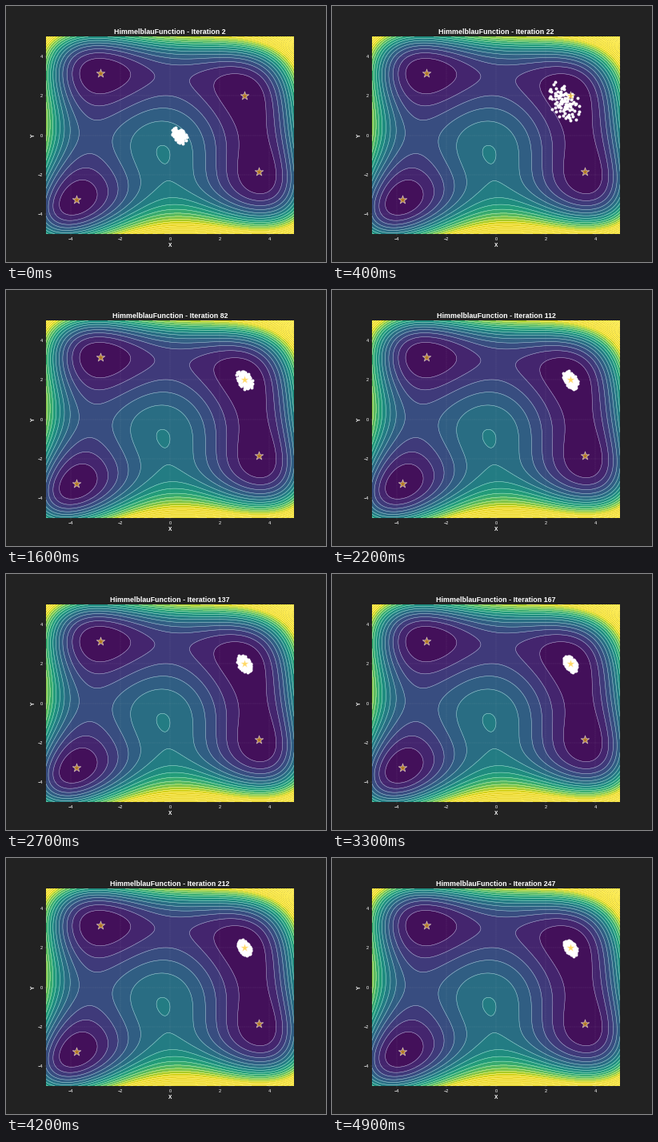
Animation, 400 px wide and 320 px high, one loop 5000 ms. Source, as a matplotlib script:

```python
import matplotlib.pyplot as plt
import numpy as np
from matplotlib.animation import FuncAnimation

FRAMES, INTERVAL = 50, 100
BACKGROUND = "#222222"
MINIMA = np.array([(3, 2), (-2.805, 3.131), (-3.779, -3.283), (3.584, -1.848)])
START = np.array([0.36, 0.0])
LAG = np.array([0.06, -0.3])
COUNT = 100

plt.rcParams["font.family"] = "Liberation Sans"


def himmelblau(x, y):
    return (x**2 + y - 11) ** 2 + (x + y**2 - 7) ** 2


rng = np.random.default_rng(7)
index = np.arange(COUNT)
disc_radius = np.sqrt((index + 0.5) / COUNT)
disc_angle = index * np.pi * (3 - np.sqrt(5))
phase = rng.uniform(0, 2 * np.pi, (2, COUNT))
speed = rng.uniform(0.3, 0.9, (2, COUNT))
# The settled swarm follows the level ellipse around the minimum (3, 2).
ellipse = 0.05 * np.linalg.cholesky(np.array([[34, -20], [-20, 74]]))


def swarm(i):
    t = min(i / 5, 1)
    ease = t * t * (3 - 2 * t)
    center = START + (MINIMA[0] - START) * ease
    center = center + LAG * np.exp(-(((i - 8) / 4) ** 2))
    spread = np.interp(i, [0, 4, 8, 16, 22, 33, 49],
                       [0.85, 2.0, 1.8, 1.12, 1.03, 0.98, 0.92])
    radius = disc_radius ** (1 + 0.6 * np.exp(-i / 10))
    points = radius * np.array([np.cos(disc_angle), np.sin(disc_angle)])
    wobble = 0.04 + 0.3 * np.exp(-i / 9)
    points = points + wobble * np.sin(speed * i + phase)
    return center + spread * (ellipse @ points).T


fig, ax = plt.subplots(figsize=(10, 8), dpi=40, facecolor=BACKGROUND)
ax.set_facecolor(BACKGROUND)

axis = np.linspace(-5, 5, 200)
X, Y = np.meshgrid(axis, axis)
Z = himmelblau(X, Y)
levels = np.arange(0, 901, 30)
ax.contourf(X, Y, Z, levels=levels, cmap="viridis", vmin=0, vmax=420, alpha=0.9)
ax.contour(X, Y, Z, levels=levels, colors="white", linewidths=1, alpha=0.6)

dots = ax.scatter([], [], s=50, color="white", linewidths=0, zorder=4)
ax.scatter(*MINIMA.T, marker="*", s=400, color="#ffc000", edgecolors="white",
           linewidths=1.5, alpha=0.6, zorder=5)

ax.set(xlim=(-5, 5), ylim=(-5, 5),
       xticks=range(-4, 5, 2), yticks=range(-4, 5, 2))
ax.grid(color="white", linestyle="--", alpha=0.15)
ax.tick_params(color="#555555", labelcolor="white", labelsize=10)
ax.spines[:].set_visible(False)
ax.set_xlabel("X", color="white", fontsize=12, fontweight="bold")
ax.set_ylabel("Y", color="white", fontsize=12, fontweight="bold")
title = ax.set_title("", color="white", fontsize=16, fontweight="bold")


def update(i):
    dots.set_offsets(swarm(i))
    title.set_text(f"HimmelblauFunction - Iteration {2 + 5 * i}")
    return dots, title


anim = FuncAnimation(fig, update, frames=FRAMES, interval=INTERVAL,
                     init_func=lambda: update(0), repeat=True, repeat_delay=0)
plt.show()
```
